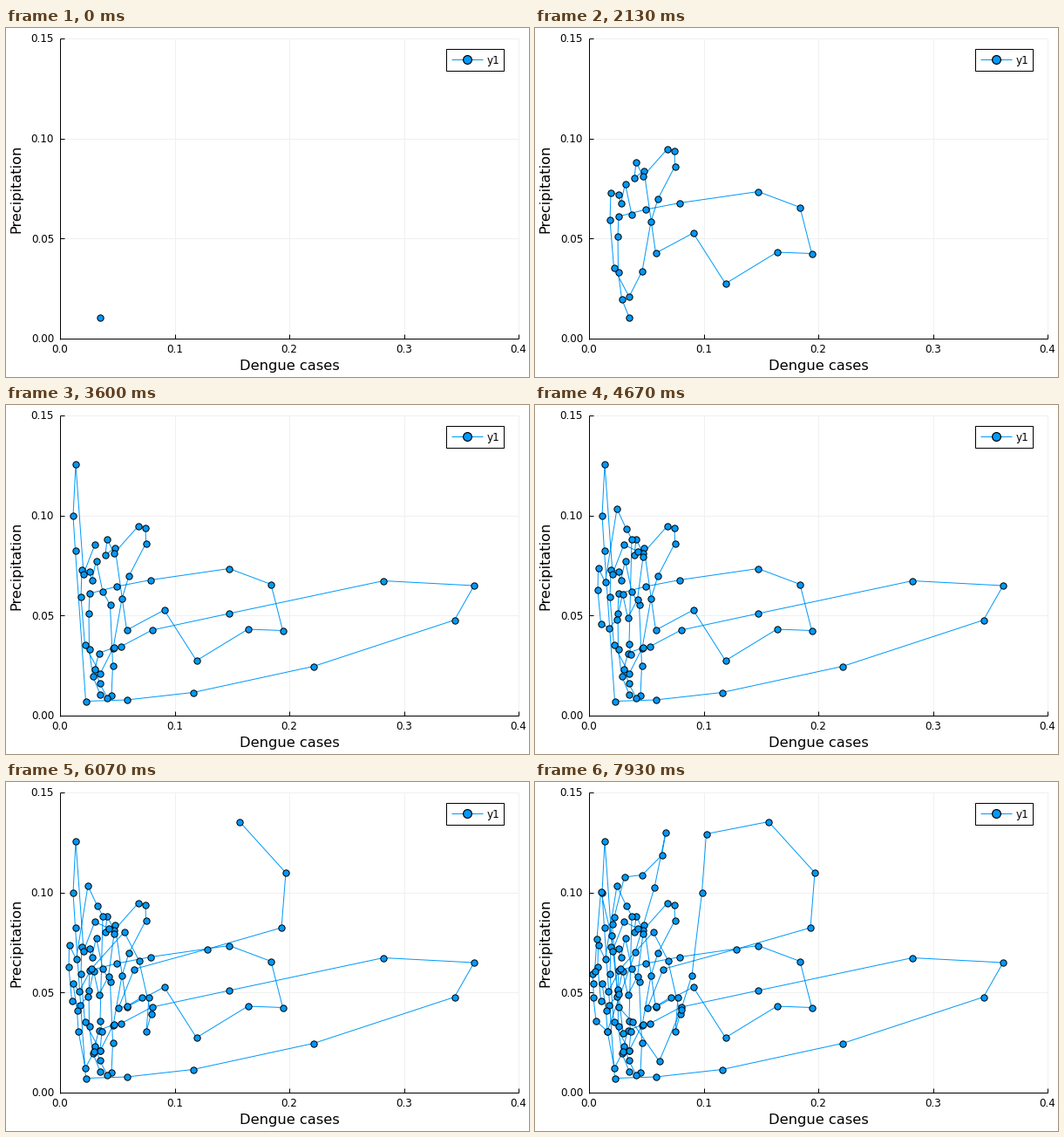
A matplotlib script that plays this animation: 600 px wide and 400 px high, repeating every 8 s.

```python
import matplotlib.pyplot as plt
import numpy as np
from matplotlib.animation import FuncAnimation
from matplotlib.patches import Rectangle

W, H, DPI = 600, 400, 100
LOOP_MS = 8000
PT = 72 / DPI  # points per pixel
BLUE = "#009afa"
LEFT, RIGHT, TOP, BOTTOM = 62, 588, 12, 356

# Monthly readings in stage pixels, one year per row
CASES_X = [
    108, 99.5, 95.5, 95, 96, 127, 166, 256, 304, 317.5, 277.5, 218.5,
    181.5, 138.5, 125, 114, 116, 124, 152, 160, 160.5, 141, 133, 123,
    108, 90.5, 86, 87, 95.5, 98.5, 103.5, 111, 119.5, 122.5, 121, 116,
    107.5, 102, 106.5, 124, 131.5, 167.5, 256, 433, 537, 514.5, 353, 214.5,
    138.5, 91.5, 79.5, 77, 80, 89, 102, 118, 124, 117.5, 106.5, 100.5,
    94, 84.5, 75.5, 72, 72.5, 80.5, 94, 104.5, 111, 108, 110, 108,
    101, 91, 83, 81.5, 77, 84, 98, 135.5, 152.5, 166.5, 161, 164,
    155.5, 138.5, 129, 147, 231, 316, 321, 268, 196.5, 191.5, 180, 167.5,
    142.5, 111.5, 95.5, 88.5, 91, 102.5, 123, 145.5, 150, 137, 115, 83,
    70, 67, 67, 66, 68.5, 71, 75.5, 87.5, 94.5, 96, 101, 93,
]
RAIN_Y = [
    331.5, 310.5, 280, 238.5, 216, 208, 200.5, 187.5, 205.5, 258.5, 257, 293,
    235, 258, 163.5, 172, 153.5, 170, 138.5, 141, 158.5, 196, 222, 278.5,
    308, 275, 220, 188.5, 190.5, 201, 178.5, 214, 229, 298.5, 333, 335.5,
    319, 302.5, 284.5, 278, 277, 258, 239, 201.5, 207, 246.5, 299.5, 329.5,
    338, 339.5, 167, 127, 68, 193.5, 160, 168, 174, 223, 244, 216.5,
    246, 255.5, 250.5, 212, 186.5, 203, 119, 141.5, 153.5, 273.5, 285.5, 307.5,
    309, 328, 285.5, 262, 230.5, 240, 214, 172, 204.5, 266, 286, 247,
    247, 257, 259, 214.5, 191.5, 167, 104, 45.5, 59.5, 126.5, 221.5, 261,
    320, 275, 257.5, 162.5, 154.5, 109, 106.5, 84, 57.5, 121, 195, 285.5,
    274, 247, 230.5, 220, 217, 180, 125.5, 176, 238, 243, 288, 315.5,
]
FRAMES = len(CASES_X)

fig = plt.figure(figsize=(W / DPI, H / DPI), dpi=DPI, facecolor="white")
ax = fig.add_axes([0, 0, 1, 1])
ax.set_xlim(0, W)
ax.set_ylim(H, 0)
ax.axis("off")


def rule(x, y, color="black", width=1.0, z=2):
    ax.plot(x, y, color=color, lw=width * PT, zorder=z, solid_capstyle="butt")


def label(x, y, text, size, **kw):
    ax.text(x, y, text, fontsize=size * PT, family="DejaVu Sans",
            va="baseline", zorder=7, **kw)


def series(x, y, size, edge, z):
    line, = ax.plot(x, y, color=BLUE, lw=1.0 * PT, marker="o",
                    ms=size * PT, mfc=BLUE, mec="black", mew=edge * PT,
                    zorder=z)
    return line


def draw_axes():
    for i, x in enumerate(np.linspace(LEFT, RIGHT, 5)):
        rule([x, x], [TOP, BOTTOM], "#f0f0f0", z=1)
        rule([x, x], [BOTTOM, BOTTOM - 5])
        label(x, 371.5, f"{i / 10:.1f}", 12, ha="center")
    for i, y in enumerate(np.linspace(BOTTOM, TOP, 4)):
        rule([LEFT, RIGHT], [y, y], "#f0f0f0", z=1)
        rule([LEFT, LEFT + 5], [y, y])
        label(55, y + 4.4, f"{i * 0.05:.2f}", 12, ha="right")
    rule([LEFT, LEFT], [TOP, BOTTOM + 0.5])
    rule([LEFT - 0.5, RIGHT], [BOTTOM, BOTTOM])
    label(325, 392, "Dengue cases", 16.3, ha="center")
    label(16, 184, "Precipitation", 16.3, ha="center", rotation=90,
          rotation_mode="anchor")


def draw_legend():
    ax.add_patch(Rectangle((505, 23.5), 66, 25.5, fc="white", ec="black",
                           lw=1.0 * PT, zorder=5))
    rule([510.5, 546.5], [36.2, 36.2], BLUE, z=6)
    series([528.5], [36.2], 9.8, 1.2, 6)
    label(551.3, 40.6, "y1", 12)


draw_axes()
draw_legend()
path = series([], [], 7.3, 1.0, 4)


def update(i):
    path.set_data(CASES_X[:i + 1], RAIN_Y[:i + 1])
    return path,


anim = FuncAnimation(fig, update, frames=FRAMES, interval=LOOP_MS / FRAMES,
                     repeat=True, repeat_delay=0, blit=False)
plt.show()
```
